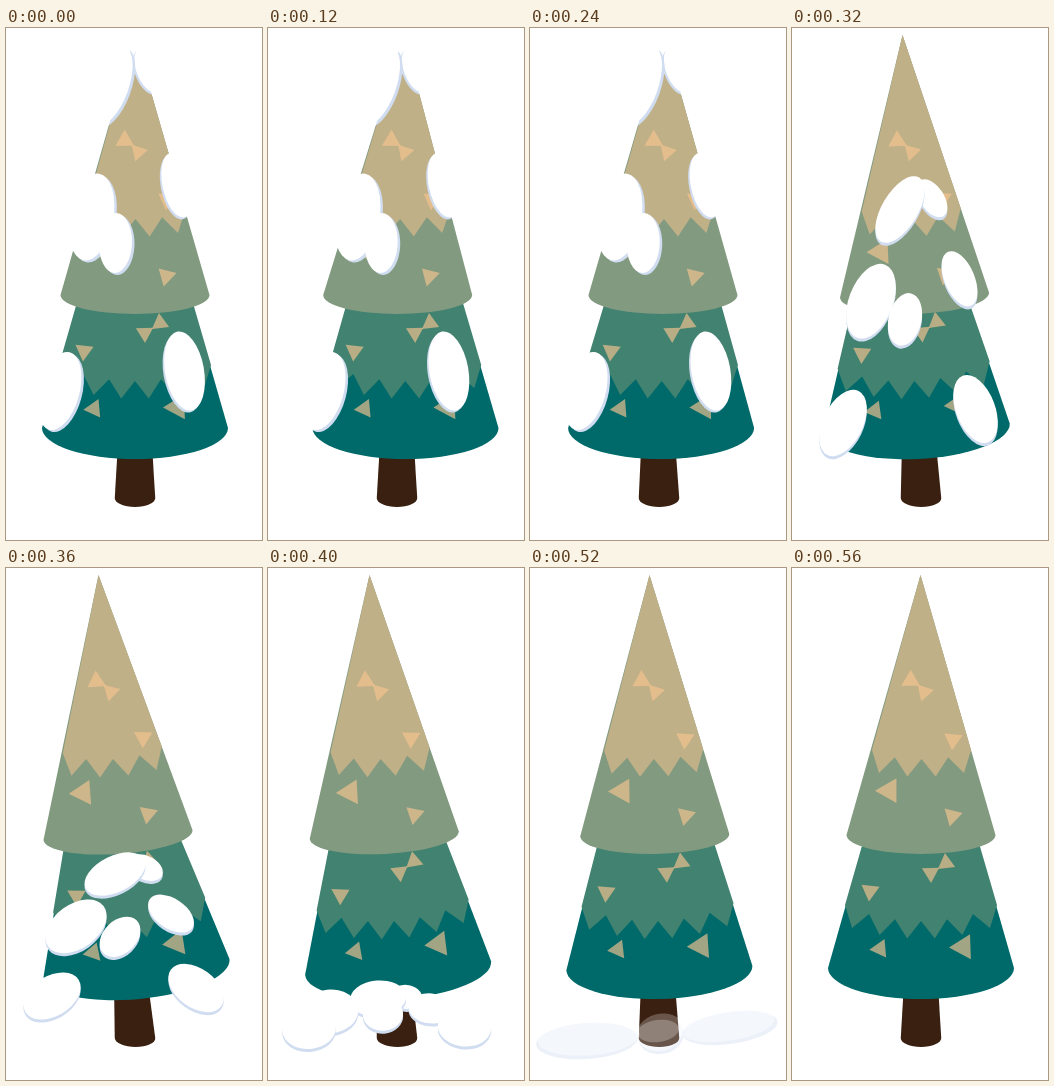
An HTML page with a canvas that plays this animation: 256 by 512 pixels, repeating every 0.6 s.

```html
<!DOCTYPE html>
<html lang="en">
<head>
<meta charset="utf-8">
<title>Tree shaking off snow</title>
<style>
  html, body { margin: 0; width: 100%; height: 100%; overflow: hidden; background: #fff; }
  canvas { display: block; width: 256px; height: 512px; }
</style>
</head>
<body>
<canvas id="stage" width="256" height="512"></canvas>
<script>
const ctx = document.getElementById('stage').getContext('2d');
const LOOP = 600, MID = 128.5, GROUND = 475, RAD = Math.PI / 180;
const SHADE = '#d0dcf0';

// Every part is a cone with a rounded base; pose gives [lean at top, shift of base, tilt]
const parts = [
  {
    color: '#3a2010', apex: 132, top: 428, base: 470, half: 20.25, depth: 9,
    pose: m => [-.5 * m.late - 3 * m.fling, 0, 0]
  },
  {
    color: '#006a6a', apex: 74, top: 280, base: 400, half: 93, depth: 31,
    cap: { color: '#428270', left: 60, right: 198, points: 11, y: 360, bulge: 11 },
    bits: [[154, 295, 10, -96], [138.7, 305, 10, 88], [78, 323, 10.5, 96],
      [88, 380.7, 10.7, 175], [171.3, 379, 14.3, 178]],
    pose: m => [8 * m.gust + 1.7 * m.late - 12.5 * m.fling - 4 * m.kick,
      8.5 * m.gust + 1.5 * m.fling - 5 * m.kick, -9 * m.fling]
  },
  {
    color: '#829a80', apex: 7, top: 7, base: 267, half: 74.5, depth: 19,
    cap: { color: '#c0b088', left: 87, right: 172, points: 7, y: 205, bulge: 4 },
    bits: [[118.7, 112.5, 10.7, -90], [132.3, 124, 9.8, -12], [161, 171.7, 10.6, 95],
      [97.3, 222.7, 14.3, 180], [160.3, 248, 10.7, -16]],
    pose: m => [7.3 * m.gust + 3.9 * m.late - 36 * m.fling,
      .7 * m.gust + 3.8 * m.late - 17 * m.fling + 2 * m.kick, -5 * m.fling]
  }
];

// x, y, radii, degrees, sideways drift per step of the fall
const clumps = [
  [141, 44, 12, 24, -22, -1],
  [107, 60, 18, 42, 20, 1],
  [170, 159, 15, 33, -12, -2.5],
  [88, 191, 22, 44, 10, -9],
  [112, 217, 16.5, 30, 2, 1],
  [56, 365, 20, 40, 15, -5],
  [177, 345, 19.5, 40, -10, 6.5]
];

// Rises from 0 to 1 and back in straight lines
function bump(t, from, peak, to) {
  const v = t < peak ? (t - from) / (peak - from) : (to - t) / (to - peak);
  return Math.max(0, v);
}

function fillPoly(points, color) {
  ctx.fillStyle = color;
  ctx.beginPath();
  points.forEach(([x, y]) => ctx.lineTo(x, y));
  ctx.fill();
}

function ellipse(x, y, rx, ry, deg, color) {
  ctx.fillStyle = color;
  ctx.beginPath();
  ctx.ellipse(x, y, rx, ry, deg * RAD, 0, 2 * Math.PI);
  ctx.fill();
}

function drawCap(apex, { color, left, right, points, y, bulge }) {
  const line = [[MID, apex], [left - 7, y - 23]];
  for (let i = 0; i < points; i++) {
    const u = 2 * i / (points - 1) - 1;
    const up = i % 2;
    const x = MID + (left + right) / 2 - MID + u * (right - left) / 2 * (1 - .06 * up);
    line.push([x, y + bulge * (1 - u * u) - 18 * up]);
  }
  line.push([right + 7, y - 23]);
  fillPoly(line, color);
}

function drawBit([x, y, r, deg]) {
  const corners = [0, 120, 240].map(a =>
    [x + r * Math.cos((deg + a) * RAD), y + r * Math.sin((deg + a) * RAD)]);
  fillPoly(corners, 'rgba(247, 197, 144, .65)');
}

function drawPart(part, moves) {
  const { apex, top, base, half, depth } = part;
  const [lean, shift, tilt] = part.pose(moves);
  const skew = (shift - lean) / (base - top);
  const rise = tilt / half;
  ctx.save();
  ctx.transform(1, rise, skew, 1, shift - skew * base, -rise * MID);
  ctx.fillStyle = part.color;
  ctx.beginPath();
  ctx.moveTo(MID, apex);
  ctx.ellipse(MID + .5, base, half, depth, 0, Math.PI, 0, true);
  ctx.fill();
  if (part.cap) drawCap(apex, part.cap);
  part.bits?.forEach(drawBit);
  ctx.restore();
}

// White over its own shade, which shows along the lower edge
function drawClump(x, y, rx, ry, deg, dx, dy) {
  ellipse(x, y, rx, ry, deg, SHADE);
  ellipse(x - dx, y - dy, rx, ry, deg, '#fff');
}

function drawResting(sway) {
  const shift = y => sway * (6 - y * .0105);
  ctx.globalCompositeOperation = 'source-atop';
  ellipse(MID + shift(0), 22, 20, 24, 0, '#fff');
  for (const [x, y, rx, ry, deg] of clumps) {
    drawClump(x + shift(y), y, rx, ry, deg, deg > 0 ? 2.5 : -1.5, 2);
  }
}

function drawFalling(n) {
  for (const [x, y, rx, ry, deg, drift] of clumps) {
    const turn = Math.min(85, Math.abs(deg) + 11 * n * n) * Math.sign(deg);
    drawClump(x + drift * n, y + (GROUND - y) * .3 * n, rx, ry * (1 - .11 * n), turn, 0, 3);
  }
}

function drawPuffs(alpha) {
  ctx.globalAlpha = alpha;
  drawClump(57, 473, 51, 18, -4, -1.5, 3.5);
  drawClump(200, 460, 48, 16, -8, 3, 3);
  ellipse(130, 464, 24, 18, -15, 'rgba(255, 255, 255, .6)');
  ellipse(128, 463, 21, 11, -8, 'rgba(255, 255, 255, .65)');
  ctx.globalCompositeOperation = 'destination-over';
  ellipse(130, 465, 23, 18, -12, '#fff');
  ellipse(131, 468, 23, 18, -12, SHADE);
}

let start;
function frame(now) {
  start ??= now;
  const slot = Math.floor((now - start) % LOOP / 40);
  // Twelve poses spread over fifteen 40 ms slots
  const step = Math.floor((slot + .4) / 1.25);
  const moves = {
    gust: bump(step, 0, 2, 6),
    late: bump(step, 2, 5, 6),
    fling: bump(step, 5, 7, 11),
    kick: bump(step, 5, 6, 7)
  };
  ctx.clearRect(0, 0, 256, 512);
  parts.forEach(part => drawPart(part, moves));
  ctx.save();
  if (step < 6) drawResting(Math.min(1, step / 2));
  else if (step < 9) drawFalling(step - 5);
  else if (step < 11) drawPuffs(step === 9 ? 1 : .4);
  ctx.restore();
  requestAnimationFrame(frame);
}
requestAnimationFrame(frame);
</script>
</body>
</html>
```
